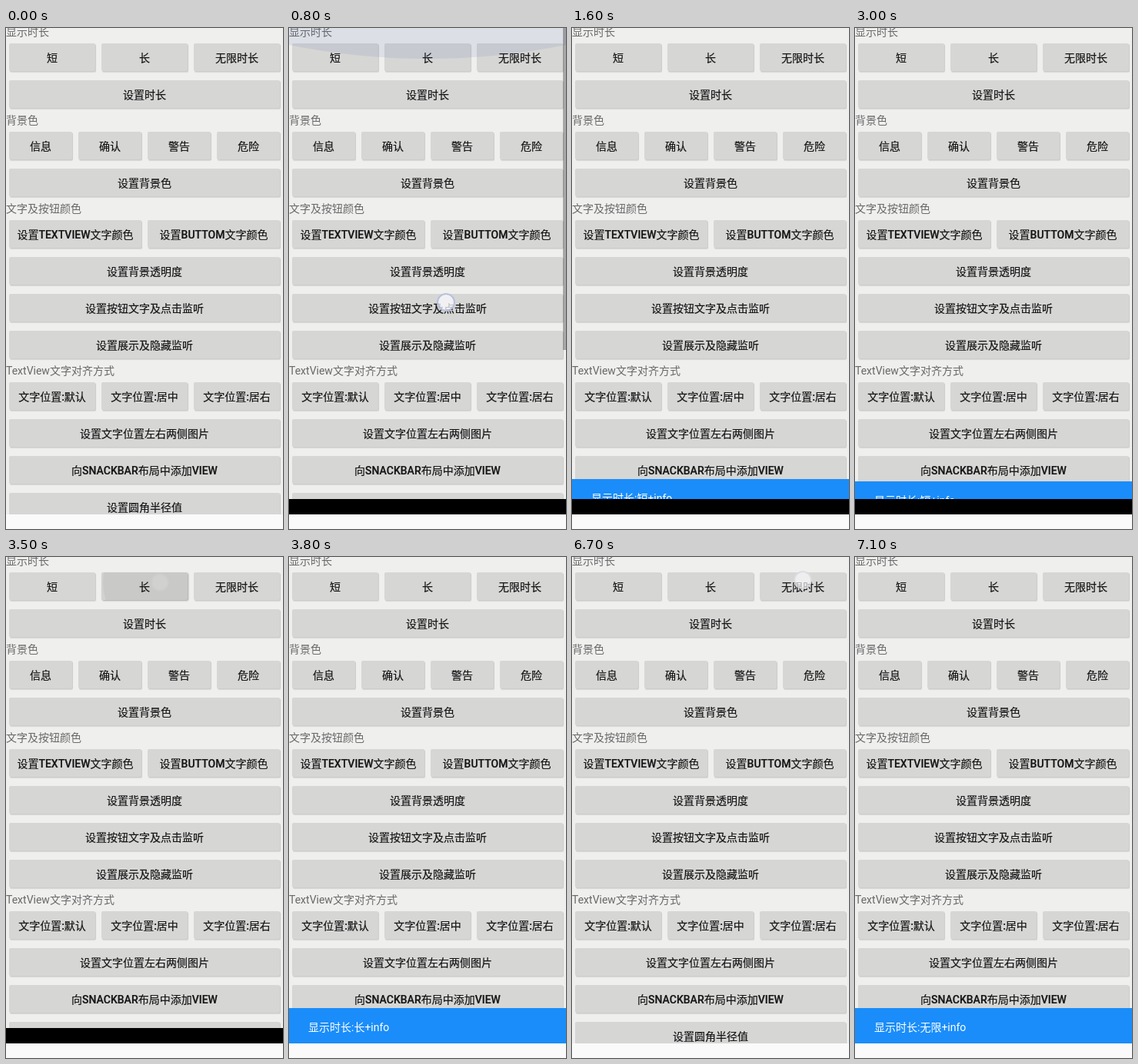
These frames come from a looping animation (360x652 px, 8 s). An HTML page:

```html
<!DOCTYPE html>
<html lang="zh-CN">
<head>
<meta charset="utf-8">
<title>Snackbar</title>
<style>
  html, body { margin: 0; width: 100%; height: 100%; overflow: hidden; background: #fafafa; }
  body { font: 14px Roboto, "Noto Sans CJK SC", "Noto Sans CJK", sans-serif; white-space: nowrap; }

  .screen { position: absolute; left: 0; top: 0; width: 360px; height: 633px; overflow: hidden; background: #efefee; }
  .list { position: absolute; left: 0; top: -5px; width: 360px; }
  .list p { margin: 0; height: 19px; line-height: 21px; color: #686868; }
  .row { display: flex; }
  .row span {
    --edge: 1px 1px 0 #cdcdcc, 1px 2px 1px rgba(0, 0, 0, .1);
    position: relative; flex: 1 1 0; height: 36px; margin: 6px 4px; overflow: hidden;
    border-radius: 2px; background: #d6d6d5; color: #141414; box-shadow: var(--edge);
    font-weight: 500; -webkit-text-stroke: .2px; line-height: 38px; text-align: center;
  }

  /* Everything shares one 8 s stepped timeline: 1.25% is 100 ms */
  .glow, .thumb, .snack, .nav, .dot, .tap, .tap i { animation: 8s step-end infinite; }

  .row .tap { animation-name: press; animation-delay: var(--at); }
  .tap i {
    position: absolute; left: var(--x); top: 13px; width: 148px; height: 148px; margin: -74px;
    border-radius: 50%; background: rgba(0, 0, 0, .04); opacity: 0;
    animation-name: ripple; animation-delay: var(--at);
  }
  @keyframes press {
    0%, 3.75% { background-color: #d6d6d5; box-shadow: var(--edge); }
    1.25% { background-color: #d2d2d1; box-shadow: 1px 1px 2px rgba(0, 0, 0, .3); }
    2.5% { background-color: #d4d4d3; box-shadow: 1px 1px 2px rgba(0, 0, 0, .25); }
  }
  @keyframes ripple {
    0%, 3.75% { opacity: 0; transform: none; }
    1.25% { opacity: 1; transform: none; }
    2.5% { opacity: .5; transform: scale(1.6); }
  }

  .dot {
    position: absolute; left: 0; top: 0; width: 24px; height: 24px; margin: -12px; box-sizing: border-box;
    border: 2px solid rgba(165, 175, 215, .75); border-radius: 50%; background: rgba(250, 250, 252, .75); opacity: 0;
  }
  .touch { left: var(--x); top: var(--y); border-color: rgba(215, 215, 220, .8); animation-name: touch; animation-delay: var(--at); }
  @keyframes touch {
    0% { opacity: .9; }
    1.25% { opacity: .2; }
    2.5% { opacity: 0; }
  }
  .drag { animation-name: drag; }
  @keyframes drag {
    0%, 12.5% { opacity: 0; transform: translate(204px, 145px); }
    7.5% { opacity: 1; transform: translate(204px, 145px); }
    10% { opacity: 1; transform: translate(204px, 357px); }
    11.25% { opacity: .4; transform: translate(204px, 380px); }
  }

  .glow { position: absolute; left: 0; top: 0; transform-origin: top; opacity: 0; animation-name: glow; }
  @keyframes glow {
    0%, 16.25% { opacity: 0; transform: none; }
    10% { opacity: 1; transform: none; }
    11.25% { opacity: .85; transform: scaleY(.85); }
    12.5% { opacity: .6; transform: scaleY(.6); }
    13.75% { opacity: .35; transform: scaleY(.35); }
    15% { opacity: .15; transform: scaleY(.15); }
  }
  .thumb { position: absolute; left: 356px; top: 0; width: 4px; height: 419px; background: rgba(0, 0, 0, .3); opacity: 0; animation-name: thumb; }
  @keyframes thumb {
    0%, 16.25% { opacity: 0; }
    10% { opacity: 1; }
    13.75% { opacity: .7; }
    15% { opacity: .3; }
  }

  .snack {
    position: absolute; left: 0; top: 587px; width: 335px; height: 48px; padding-left: 25px;
    background: #1a8dfa; color: #fff; line-height: 51px; transform: translateY(48px);
  }
  .short { animation-name: short; }
  .long { animation-name: long; }
  .endless { animation-name: endless; }
  @keyframes short {
    0%, 38.75% { transform: translateY(48px); }
    18.75% { transform: translateY(14px); }
    20% { transform: none; }
    37.5% { transform: translateY(3px); }
  }
  @keyframes long {
    0%, 81.25% { transform: translateY(48px); }
    45% { transform: translateY(38px); }
    46.25% { transform: translateY(14px); }
    47.5% { transform: none; }
    78.75% { transform: translateY(1px); }
    80% { transform: translateY(26px); }
  }
  @keyframes endless {
    0% { transform: translateY(48px); }
    86.25% { transform: translateY(38px); }
    87.5% { transform: translateY(14px); }
    88.75%, 100% { transform: none; }
  }

  .nav { position: absolute; left: 0; top: 613px; width: 360px; height: 20px; background: #000; opacity: 0; animation-name: nav; }
  @keyframes nav {
    0%, 45% { opacity: 0; }
    6.25% { opacity: 1; }
  }

  /* Negative delays place each tap at 1.3 s, 3.4 s and 6.7 s */
  .t1 { --at: -6.7s; }
  .t2 { --at: -4.6s; }
  .t3 { --at: -1.3s; }
</style>
</head>
<body>
<div class="screen">
  <div class="list">
    <p>显示时长</p>
    <div class="row">
      <span class="tap t1" style="--x:97px"><i></i>短</span>
      <span class="tap t2" style="--x:76px"><i></i>长</span>
      <span class="tap t3" style="--x:56px"><i></i>无限时长</span>
    </div>
    <div class="row"><span>设置时长</span></div>
    <p>背景色</p>
    <div class="row"><span>信息</span><span>确认</span><span>警告</span><span>危险</span></div>
    <div class="row"><span>设置背景色</span></div>
    <p>文字及按钮颜色</p>
    <div class="row"><span>设置TEXTVIEW文字颜色</span><span>设置BUTTOM文字颜色</span></div>
    <div class="row"><span>设置背景透明度</span></div>
    <div class="row"><span>设置按钮文字及点击监听</span></div>
    <div class="row"><span>设置展示及隐藏监听</span></div>
    <p>TextView文字对齐方式</p>
    <div class="row"><span>文字位置:默认</span><span>文字位置:居中</span><span>文字位置:居右</span></div>
    <div class="row"><span>设置文字位置左右两侧图片</span></div>
    <div class="row"><span>向SNACKBAR布局中添加VIEW</span></div>
    <div class="row"><span>设置圆角半径值</span></div>
  </div>
  <svg class="glow" width="360" height="40"><path d="M0 0H360V22Q180 58 0 22Z" fill="#4a57a8" fill-opacity=".1"/></svg>
  <div class="thumb"></div>
  <div class="snack short">显示时长:短+info</div>
  <div class="snack long">显示时长:长+info</div>
  <div class="snack endless">显示时长:无限+info</div>
  <div class="nav"></div>
  <div class="dot drag"></div>
  <div class="dot touch t1" style="--x:101px;--y:33px"></div>
  <div class="dot touch t2" style="--x:200px;--y:33px"></div>
  <div class="dot touch t3" style="--x:300px;--y:30px"></div>
</div>
</body>
</html>
```
